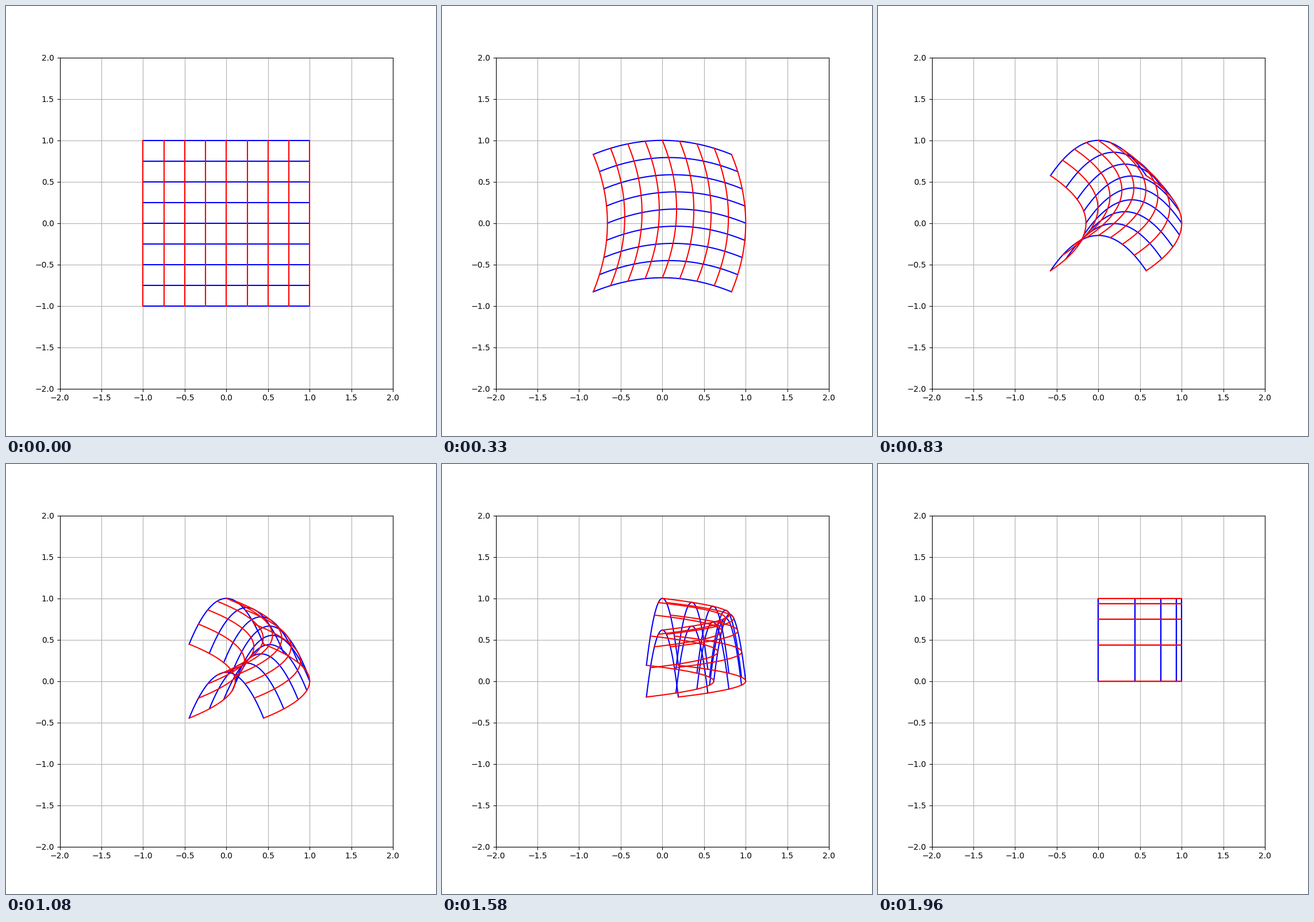
Recreate the animation shown at these times as a matplotlib script. Size 748 px wide and 748 px high, loop 3000 ms.

```python
import numpy as np
import matplotlib.pyplot as plt
from matplotlib.animation import FuncAnimation

SIZE, DPI = 748, 100
LOOP, INTERVAL = 3000, 20   # ms
FPS, STEPS = 24, 47         # the warp advances 24 times a second, then holds

fig, ax = plt.subplots(figsize=(SIZE / DPI, SIZE / DPI), dpi=DPI)
ax.set_xlim(-2, 2)
ax.set_ylim(-2, 2)
ax.grid(True)

levels = np.linspace(-1, 1, 9)
s = np.linspace(-1, 1, 100)
rows = [(s, np.full_like(s, v)) for v in levels]
cols = [(np.full_like(s, v), s) for v in levels]
curves = rows + cols
lines = [ax.plot([], [], color)[0]
         for color in ["b"] * len(rows) + ["r"] * len(cols)]


def warp(x, y, t):
    """Blend from the identity to (1 - y^2, 1 - x^2)."""
    return (1 - t) * x + t * (1 - y**2), (1 - t) * y + t * (1 - x**2)


def progress(ms):
    # step times are rounded to 10 ms
    step = ((ms + 5) * FPS - 1) // 1000
    return min(step, STEPS) / STEPS


def update(i):
    t = progress(i * INTERVAL + INTERVAL // 2)
    for line, (x, y) in zip(lines, curves):
        line.set_data(*warp(x, y, t))
    return lines


def init():
    return update(0)


anim = FuncAnimation(fig, update, frames=LOOP // INTERVAL, init_func=init,
                     interval=INTERVAL, repeat=True, repeat_delay=0, blit=False)
plt.show()
```
